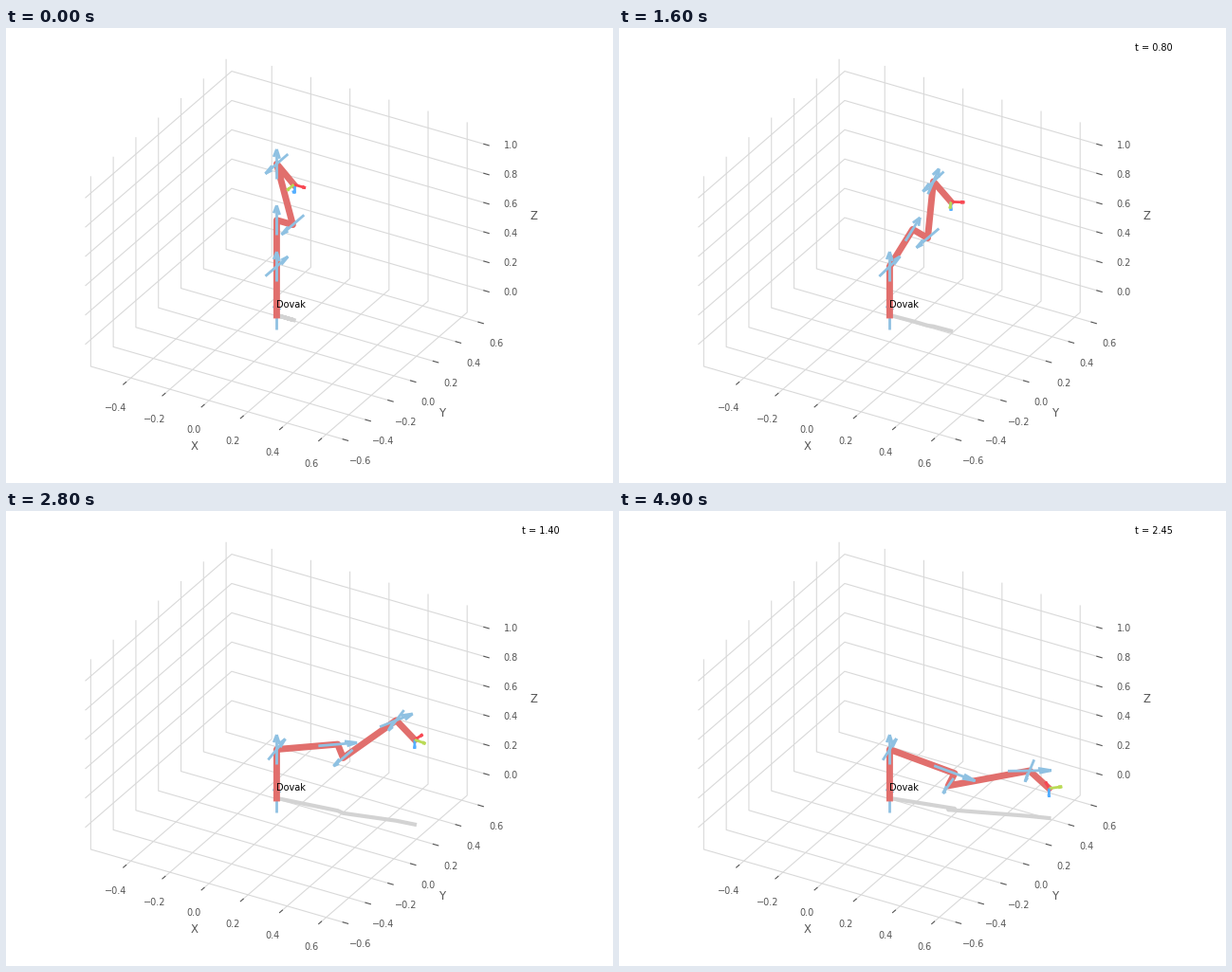
Recreate the animation shown at these times as a matplotlib script. Size 640 by 480 pixels, loop 5 s.

```python
import numpy as np
import matplotlib.pyplot as plt
from matplotlib.animation import FuncAnimation
from matplotlib.collections import LineCollection

WIDTH, HEIGHT, DPI = 640, 480, 100
FRAMES, INTERVAL, TIME_STEP = 50, 100, 0.05
NAME = "Dovak"

# Orthographic view: pixel position of the world origin and of each unit axis
ORIGIN = np.array([285.4, 302.95])
AXES = np.array([[206.0, 59.5], [118.95, -103.0], [0.0, -154.5]])
TOWARD_VIEWER = np.array([0.433, -0.75, 0.5])

CENTER = np.array([0.044, 0.0, 0.4665])
LOW, HIGH = CENTER - 0.6492, CENTER + 0.6492
TICK_UNIT, LABEL_GAP, TITLE_GAP = 0.0104, 0.083, 0.157
GRAY, GRID = "#555555", "#d9d9d9"
JOINT_COLOR = "#8FC1E2"
TOOL_COLORS = ("#F84752", "#BADA55", "#54AEFF")

# Modified Denavit-Hartenberg rows: a, d, alpha
RIGHT = np.pi / 2
LINKS = [
    (0, 0.333, 0), (0, 0, -RIGHT), (0, 0.316, RIGHT), (0.0825, 0, RIGHT),
    (-0.0825, 0.384, -RIGHT), (0, 0, RIGHT), (0.088, 0.107, RIGHT),
]
GOAL = np.array([0.2134, 1.867, -0.2264, 0.4825, 0.2198, 1.396, -2.037])

plt.rcParams.update({"font.family": "DejaVu Sans", "font.size": 7})


def project(points):
    return ORIGIN + np.asarray(points) @ AXES


def link_transform(a, d, alpha, theta):
    ct, st = np.cos(theta), np.sin(theta)
    ca, sa = np.cos(alpha), np.sin(alpha)
    return np.array([
        [ct, -st, 0, a],
        [st * ca, ct * ca, -sa, -sa * d],
        [st * sa, ct * sa, ca, ca * d],
        [0, 0, 0, 1],
    ])


def joint_angles(frame):
    t = frame / (FRAMES - 1)
    return GOAL * t**3 * (10 - 15 * t + 6 * t**2)


def link_frames(angles):
    frames = [np.eye(4)]
    for link, angle in zip(LINKS, angles):
        frames.append(frames[-1] @ link_transform(*link, angle))
    return frames


def rotate(vector, axis, angle):
    c, s = np.cos(angle), np.sin(angle)
    return vector * c + np.cross(axis, vector) * s + axis * (axis @ vector) * (1 - c)


def arrow_segments(start, vector):
    """Shaft and two barbs of a 3D arrow."""
    tip = start + vector
    flat = np.hypot(vector[0], vector[1])
    if flat > 1e-9:
        axis = np.array([vector[1], -vector[0], 0]) / flat
    else:
        axis = np.array([0.0, 1.0, 0.0])
    barbs = [tip - 0.3 * rotate(vector, axis, sign * np.radians(15)) for sign in (1, -1)]
    return np.array([[start, tip], [barbs[0], tip], [barbs[1], tip]])


def place_arrow(collection, start, vector):
    segments = arrow_segments(start, vector)
    collection.set_segments(project(segments))
    return (segments @ TOWARD_VIEWER).max()


def draw_axis(index, ticks, edge, wall, tick_dir, title):
    """Grid lines, tick marks and labels; edge holds the tick side of each axis."""
    outward = np.sign(edge - CENTER)
    outward[index] = 0
    grid, marks = [], []
    for value in ticks:
        path = [np.array(p, dtype=float) for p in wall]
        for point in path:
            point[index] = value
        grid.append(project(path))
        base = edge.copy()
        base[index] = value
        step = np.zeros(3)
        step[tick_dir] = outward[tick_dir] * TICK_UNIT
        marks.append(project([base - step, base + 2 * step]))
        x, y = project(base + LABEL_GAP * outward)
        label = f"{value:.1f}".replace("-", "\u2212")
        ax.text(x, y, label, color=GRAY, ha="center", va="top")
    ax.add_collection(LineCollection(grid, colors=GRID, linewidths=0.8, zorder=0.5))
    ax.add_collection(LineCollection(marks, colors=GRAY, linewidths=0.8, zorder=0.8))
    middle = edge.copy()
    middle[index] = CENTER[index]
    x, y = project(middle + TITLE_GAP * outward)
    ax.text(x, y, title, color=GRAY, fontsize=8.4, ha="center", va="center")


def add_arrow(color):
    return ax.add_collection(LineCollection([], colors=color, linewidths=2))


fig = plt.figure(figsize=(WIDTH / DPI, HEIGHT / DPI), dpi=DPI, facecolor="white")
ax = fig.add_axes([0, 0, 1, 1])
ax.set(xlim=(0, WIDTH), ylim=(HEIGHT, 0))
ax.axis("off")

(x0, y0, z0), (x1, y1, z1) = LOW, HIGH
draw_axis(0, np.arange(-2, 4) / 5, np.array([x1, y0, z0]),
          [(0, y0, z0), (0, y1, z0), (0, y1, z1)], 1, "X")
draw_axis(1, np.arange(-3, 4) / 5, np.array([x1, y0, z0]),
          [(x1, 0, z0), (x0, 0, z0), (x0, 0, z1)], 0, "Y")
draw_axis(2, np.arange(0, 6) / 5, np.array([x1, y1, z0]),
          [(x0, y0, 0), (x0, y1, 0), (x1, y1, 0)], 0, "Z")

shadow, = ax.plot([], [], color="lightgrey", linewidth=3, zorder=1)
arm, = ax.plot([], [], color="#E16F6D", linewidth=5, zorder=2)
joint_arrows = [add_arrow(JOINT_COLOR) for _ in LINKS]
tool_arrows = [add_arrow(color) for color in TOOL_COLORS]
ax.text(*project([0, 0, 0.05]), NAME, color="black", zorder=3)
clock = fig.text(0.85, 0.95, "", color="black")


def update(frame):
    frames = link_frames(joint_angles(frame))
    points = np.array([f[:3, 3] for f in frames])
    arm.set_data(*project(points).T)
    shadow.set_data(*project(points * [1, 1, 0]).T)

    for i, arrow in enumerate(joint_arrows):
        axis = 0.2 * frames[i][:3, 2]
        nearness = place_arrow(arrow, points[i] - axis / 2, axis)
        # The base axis stays behind the arm
        arrow.set_zorder(1.5 if i == 0 else 4 + nearness)
    for i, arrow in enumerate(tool_arrows):
        nearness = place_arrow(arrow, points[-1], 0.06 * frames[-1][:3, i])
        arrow.set_zorder(4 + nearness)

    clock.set_text(f"t = {frame * TIME_STEP:.2f}" if frame else "")
    return [shadow, arm, *joint_arrows, *tool_arrows, clock]


animation = FuncAnimation(fig, update, frames=FRAMES, interval=INTERVAL,
                          repeat=True, repeat_delay=0, blit=False)
plt.show()
```
